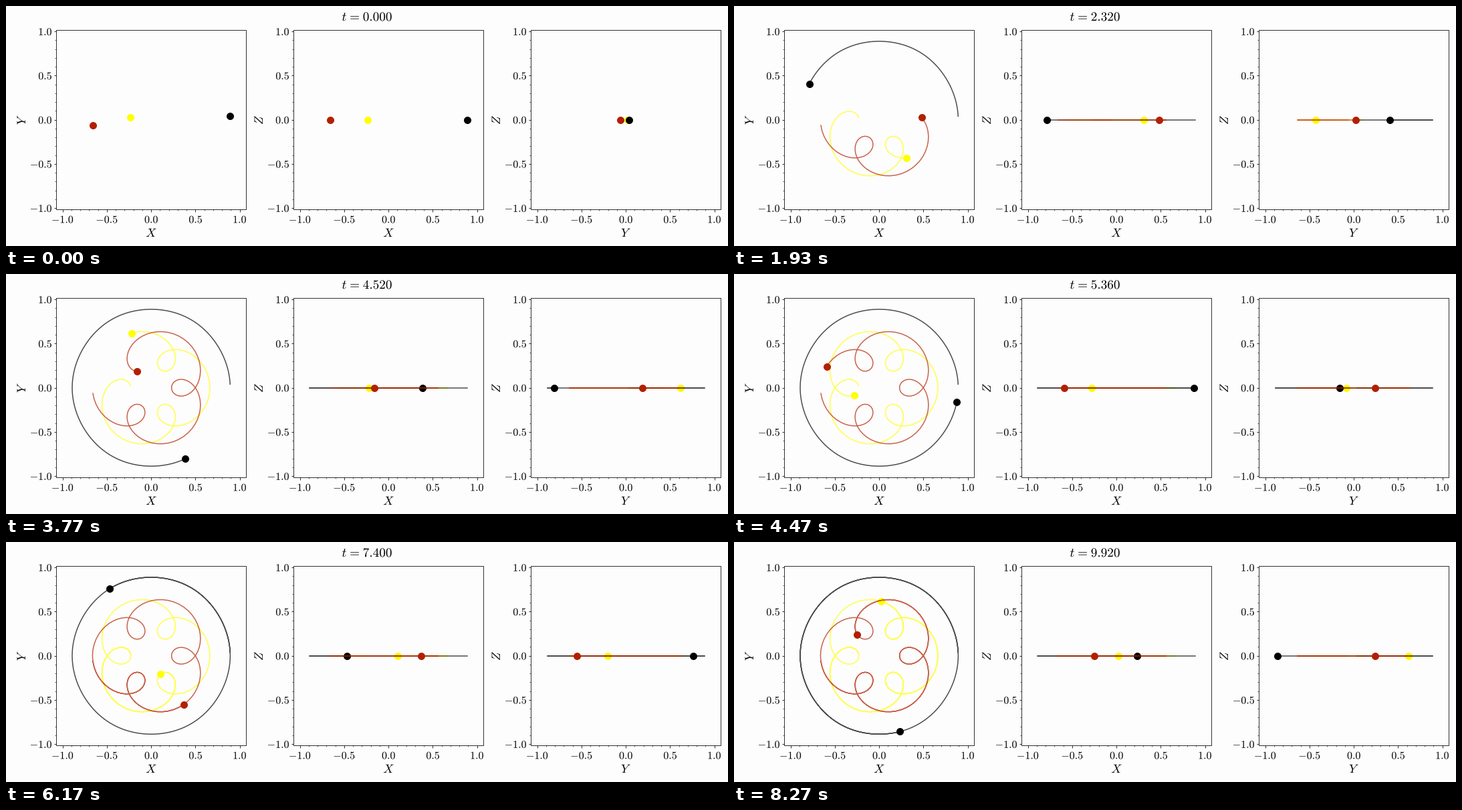
Recreate the animation shown at these times as a matplotlib script. Size 1080 px wide and 360 px high, loop 8.3 s.

```python
import numpy as np
import matplotlib.pyplot as plt
from matplotlib.animation import FuncAnimation
from matplotlib.collections import LineCollection
from matplotlib.patches import PathPatch
from matplotlib.path import Path
from matplotlib.textpath import TextPath
from matplotlib.transforms import Affine2D

plt.rcParams["mathtext.fontset"] = "cm"

W, H = 1080, 360
STEPS, LOOP_MS, DT = 249, 8300, 0.04
FRAMES = STEPS + 1                  # the last pose is held once
PERIOD = 5.560                      # one turn of the outer body
SCALE, MID_Y = 132.5, 170.6
HALF_W, HALF_H = 142, 134.5
PANELS = [(217.2, "X", "Y"), (572.2, "X", "Z"), (927.2, "Y", "Z")]
COLORS = ["yellow", "black", "#b22000"]


# Three unit masses: b is the outer body, -b/2 +- q are the inner pair.
def pull(d):
    return d / abs(d) ** 3


def rates(s):
    b, q, vb, vq = s
    red, yellow = q - b / 2, -q - b / 2
    acc_b = pull(red - b) + pull(yellow - b)
    acc_q = (pull(b - red) - pull(b - yellow)) / 2 + pull(yellow - red)
    return np.array([vb, vq, acc_b, acc_q])


def advance(s, time, steps):
    h = time / steps
    for _ in range(steps):
        k1 = rates(s)
        k2 = rates(s + h / 2 * k1)
        k3 = rates(s + h / 2 * k2)
        k4 = rates(s + h * k3)
        s = s + h / 6 * (k1 + 2 * k2 + 2 * k3 + k4)
    return s


def launch(p):
    b, d, vb, vd = p
    return np.array([b, -d, 1j * vb, -1j * vd], dtype=complex)


def mismatch(p):
    """Distance from a symmetric isosceles pose after a twelfth of a turn."""
    turn = np.exp(-1j * np.pi / 6 * np.array([1, 4, 1, 4]))
    b, q, vb, vq = advance(launch(p), PERIOD / 12, 60) * turn
    return np.array([b.imag, q.imag, vb.real, vq.real])


def periodic_start():
    p, eps = np.array([0.89, 0.214, 1.006, 1.11]), 1e-6
    for _ in range(7):
        r = mismatch(p)
        jac = np.column_stack([(mismatch(p + eps * e) - r) / eps for e in np.eye(4)])
        p = p - np.linalg.solve(jac, r)
    return launch(p)


def orbits():
    s, rows = periodic_start(), []
    for _ in range(STEPS):
        s = advance(s, DT, 8)
        b, q = s[:2]
        rows.append([-q - b / 2, b, q - b / 2])
    return np.array(rows)


fig = plt.figure(figsize=(W / 72, H / 72), dpi=72, facecolor="#fdfdfd")
ax = fig.add_axes([0, 0, 1, 1])
ax.set(xlim=(0, W), ylim=(H, 0))
ax.axis("off")


def label(x, y, text, size, right=False, middle=False, angle=0):
    """Outline of a formula, on its baseline unless middle is set."""
    path = TextPath((0, 0), f"${text}$", size=size)
    path = Affine2D().rotate_deg(angle).transform_path(path)
    box = path.get_extents()
    dx = box.x1 if right else (box.x0 + box.x1) / 2
    dy = (box.y0 + box.y1) / 2 if middle else 0
    place = Affine2D().translate(-dx, -dy).scale(1, -1).translate(x, y)
    return place.transform_path(path)


def add_ink(path):
    return ax.add_patch(PathPatch(path, facecolor="black", linewidth=0))


def add_lines(segments, width):
    ax.add_collection(LineCollection(segments, colors="black", linewidths=width,
                                     capstyle="butt", snap=True), autolim=False)


def draw_panel(cx, xname, yname):
    left, right = cx - HALF_W, cx + HALF_W
    top, bottom = MID_Y - HALF_H, MID_Y + HALF_H
    major, minor = [], []
    labels = [label(cx, 346.2, xname, 18),
              label(cx - 194.5, MID_Y + 0.5, yname, 18, middle=True, angle=90)]
    for k in range(-10, 11):
        x, y = cx + SCALE * k / 10, MID_Y - SCALE * k / 10
        ticks, size = (minor, 2) if k % 5 else (major, 3.5)
        ticks += [[(x, bottom), (x, bottom + size)], [(left, y), (left - size, y)]]
        if k % 5 == 0:
            text = f"{k / 10:.1f}"
            labels += [label(x, 325.4, text, 16),
                       label(left - 7.3, y + 0.5, text, 16, right=True, middle=True)]
    box = [(left, top), (right, top), (right, bottom), (left, bottom), (left, top)]
    add_lines([box] + major, 0.8)
    add_lines(minor, 0.6)
    add_ink(Path.make_compound_path(*labels))


def title_path(n):
    gap = r"\hspace{0.08}"
    return label(539.8, 22.2, f"t{gap}={gap}{n * DT:.3f}", 19.2)


pos = orbits()
coords = {"X": pos.real, "Y": pos.imag, "Z": np.zeros(pos.shape)}
movers = []
for cx, xname, yname in PANELS:
    draw_panel(cx, xname, yname)
    px = cx + SCALE * coords[xname]
    py = MID_Y - SCALE * coords[yname]
    for i, color in enumerate(COLORS):
        trail, = ax.plot([], [], color=color, alpha=0.7, lw=1.5, zorder=3 + i)
        dot, = ax.plot([], [], "o", color=color, ms=10, mew=1, zorder=3 + i)
        movers.append((trail, dot, px[:, i], py[:, i]))
title = add_ink(title_path(0))


def update(frame):
    n = min(frame, STEPS - 1)
    title.set_path(title_path(n))
    for trail, dot, x, y in movers:
        trail.set_data(x[:n + 1], y[:n + 1])
        dot.set_data(x[n:n + 1], y[n:n + 1])
    return [title]


anim = FuncAnimation(fig, update, frames=FRAMES, interval=LOOP_MS / FRAMES,
                     repeat=True, repeat_delay=0, blit=False)
plt.show()
```
